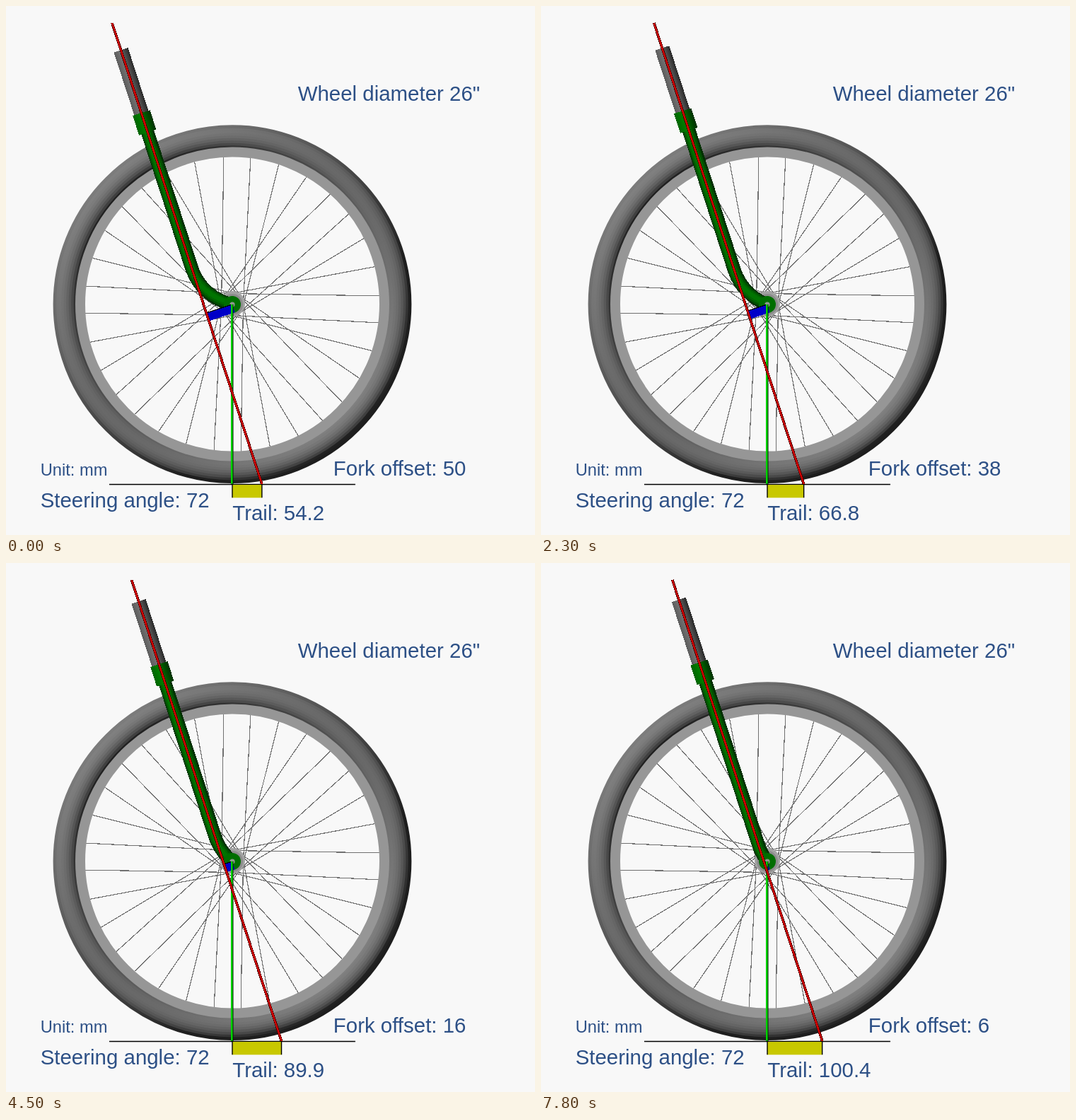
An HTML page for the animation above (8 s loop, 748 by 748 pixels).

```html
<!DOCTYPE html>
<html lang="en">
<head>
<meta charset="utf-8">
<title>Steering trail</title>
<style>
  html, body { margin: 0; width: 100%; height: 100%; overflow: hidden; background: #f8f8f8; }
  svg { display: block; width: 100vw; height: 100vh; }
  text { font: 29.45px "Liberation Sans", Arial, sans-serif; fill: #2d5086; }
  text.small { font-size: 23.7px; }
  .crisp { shape-rendering: crispEdges; }
</style>
</head>
<body>
<svg id="stage" viewBox="0 0 748 748">
  <defs>
    <linearGradient id="steel">
      <stop offset="0" stop-color="#5c5c5c"/>
      <stop offset=".35" stop-color="#707070"/>
      <stop offset=".7" stop-color="#4a4a4a"/>
      <stop offset="1" stop-color="#282828"/>
    </linearGradient>
    <linearGradient id="collar">
      <stop offset="0" stop-color="#006400"/>
      <stop offset=".35" stop-color="#007c00"/>
      <stop offset=".7" stop-color="#005400"/>
      <stop offset="1" stop-color="#003000"/>
    </linearGradient>
  </defs>
  <g id="wheel" fill="none"></g>
  <g id="fork" class="crisp">
    <g id="tube" fill="none"></g>
    <rect x="-10.5" y="-390.7" width="21" height="96" fill="url(#steel)"/>
    <rect x="-12.8" y="-297.3" width="25.6" height="29" fill="url(#collar)"/>
  </g>
  <circle cx="320" cy="422" r="12" fill="#006e00"/>
  <circle cx="320" cy="422" r="3.6" fill="#8c988c"/>
  <g id="gap" class="crisp">
    <rect id="gapBox" height="12" fill="#0000c8"/>
    <path id="gapEdge" stroke="#000" stroke-width="1.2"/>
  </g>
  <path d="M319.8 422V676" stroke="#002800" stroke-width="3.4"/>
  <path d="M319.3 422V676" stroke="#00f400" stroke-width="2"/>
  <path d="M146 676.4H494" stroke="#000" stroke-width="1.5"/>
  <rect id="trailBox" x="320" y="677" height="18.3" fill="#c8c800"/>
  <path id="trailEdges" stroke="#000" stroke-width="1.4"/>
  <path id="axisEdge" class="crisp" stroke="#4a0000" stroke-width="3.8"/>
  <path id="axis" class="crisp" stroke="#cc0000" stroke-width="2.3"/>
  <text x="412.7" y="134">Wheel diameter 26"</text>
  <text x="48.7" y="664" class="small">Unit: mm</text>
  <text x="462.8" y="664">Fork offset: <tspan id="offsetText"></tspan></text>
  <text x="48.7" y="708.5">Steering angle: 72</text>
  <text x="320.3" y="726.5">Trail: <tspan id="trailText"></tspan></text>
</svg>
<script>
const NS = "http://www.w3.org/2000/svg";
const $ = id => document.getElementById(id);
const CX = 320, CY = 422, GROUND = 676;
const WHEEL_R = 328.5, BEND_R = 100;      // mm
const SCALE = (GROUND - CY) / WHEEL_R;    // px per mm
const ANGLE = 72 * Math.PI / 180;
const SIN = Math.sin(ANGLE), COS = Math.cos(ANGLE), TAN = Math.tan(ANGLE);

function add(parent, tag, attrs) {
  const el = document.createElementNS(NS, tag);
  for (const key in attrs) el.setAttribute(key, attrs[key]);
  return parent.appendChild(el);
}

function set(id, attrs) {
  for (const key in attrs) $(id).setAttribute(key, attrs[key]);
}

function ring(r, width, stroke) {
  add($("wheel"), "circle", { cx: CX, cy: CY - .4, r, "stroke-width": width, stroke });
}

// Tyre as concentric bands of a torus, lit from the upper left.
function drawTyre() {
  const mid = 235.4, tube = 17.5, bands = 10, overlap = 1;
  for (let i = 0; i < bands; i++) {
    const s = -1 + (2 * i + 1) / bands;
    const r = mid + s * tube, id = "band" + i, d = r * Math.SQRT1_2;
    const grad = add($("stage").querySelector("defs"), "linearGradient", {
      id, gradientUnits: "userSpaceOnUse",
      x1: CX - d, y1: CY - d, x2: CX + d, y2: CY + d
    });
    for (let k = 0; k <= 12; k++) {
      const facing = 1 - k / 6;
      const light = Math.max(0, .707 * (s * facing + Math.sqrt(1 - s * s)));
      const v = Math.round(30 + 98 * light ** .8);
      add(grad, "stop", { offset: k / 12, "stop-color": `rgb(${v},${v},${v})` });
    }
    ring(r, 2 * tube / bands + overlap, `url(#${id})`);
  }
}

// Four spoke types repeat every 45 degrees; side tells which way each leaves the hub.
function drawSpokes() {
  const types = [[93.3, 1], [82.9, -1], [71.7, -1], [59.8, 1]];
  const point = (r, deg) => {
    const a = deg * Math.PI / 180;
    return `${CX + r * Math.cos(a)} ${CY - r * Math.sin(a)}`;
  };
  let d = "";
  for (let turn = 0; turn < 360; turn += 45)
    for (const [deg, side] of types)
      d += `M${point(210, deg + turn)}L${point(15.5, deg + turn + side * 90)}`;
  add($("wheel"), "path", { d, class: "crisp", stroke: "#707070", "stroke-width": 1.2 });
}

drawTyre();
drawSpokes();
ring(215, 14, "#969696");
add($("wheel"), "circle", { cx: CX, cy: CY - 1, r: 18, fill: "#a2a2a2" });
add($("wheel"), "circle", { cx: CX, cy: CY, r: 15, fill: "#8c8c8c" });

const layers = [[18.8, 0, "#003000"], [15, 1.3, "#005000"], [10.5, 2.2, "#006600"], [6, 3, "#007400"]]
  .map(([width, s, stroke]) => add($("tube"), "path", {
    stroke, "stroke-width": width,
    transform: `translate(${-s * (SIN - COS)} ${-s * (SIN + COS)})`
  }));

// Fork offset in mm: held, stepped down to zero, held, stepped up again.
function offsetAt(t) {
  const steps = from => Math.max(0, Math.floor((t - from) / 200) + 1);
  return t < 7400 ? 50 - 2 * Math.min(25, steps(1300)) : 2 * steps(7400);
}

function draw(t) {
  const offset = offsetAt(t), d = offset * SCALE;
  const trail = WHEEL_R / TAN - offset / SIN;
  const x = CX + trail * SCALE;
  const bend = BEND_R * SCALE;
  const rise = Math.sqrt(bend * bend - (bend - d) ** 2);
  const place = `translate(${CX - d * SIN} ${CY + d * COS}) rotate(-18)`;
  set("fork", { transform: place });
  set("gap", { transform: place, visibility: d ? "visible" : "hidden" });
  const path = `M0 -280V${-rise}` + (d ? `A${bend} ${bend} 0 0 0 ${d} 0` : "");
  layers.forEach(el => el.setAttribute("d", path));
  set("gapBox", { width: d });
  set("gapEdge", { d: `M0 0H${d}` });
  const line = `M${x - (GROUND - 24) / TAN} 24L${x} ${GROUND}`;
  set("axisEdge", { d: line });
  set("axis", { d: line });
  set("trailBox", { width: x - CX });
  set("trailEdges", { d: `M320 676V695.3M${x} 676V695.3` });
  $("offsetText").textContent = offset;
  $("trailText").textContent = trail.toFixed(1);
}

const start = performance.now();
function tick() {
  draw((performance.now() - start) % 8000);
  requestAnimationFrame(tick);
}
tick();
</script>
</body>
</html>
```
